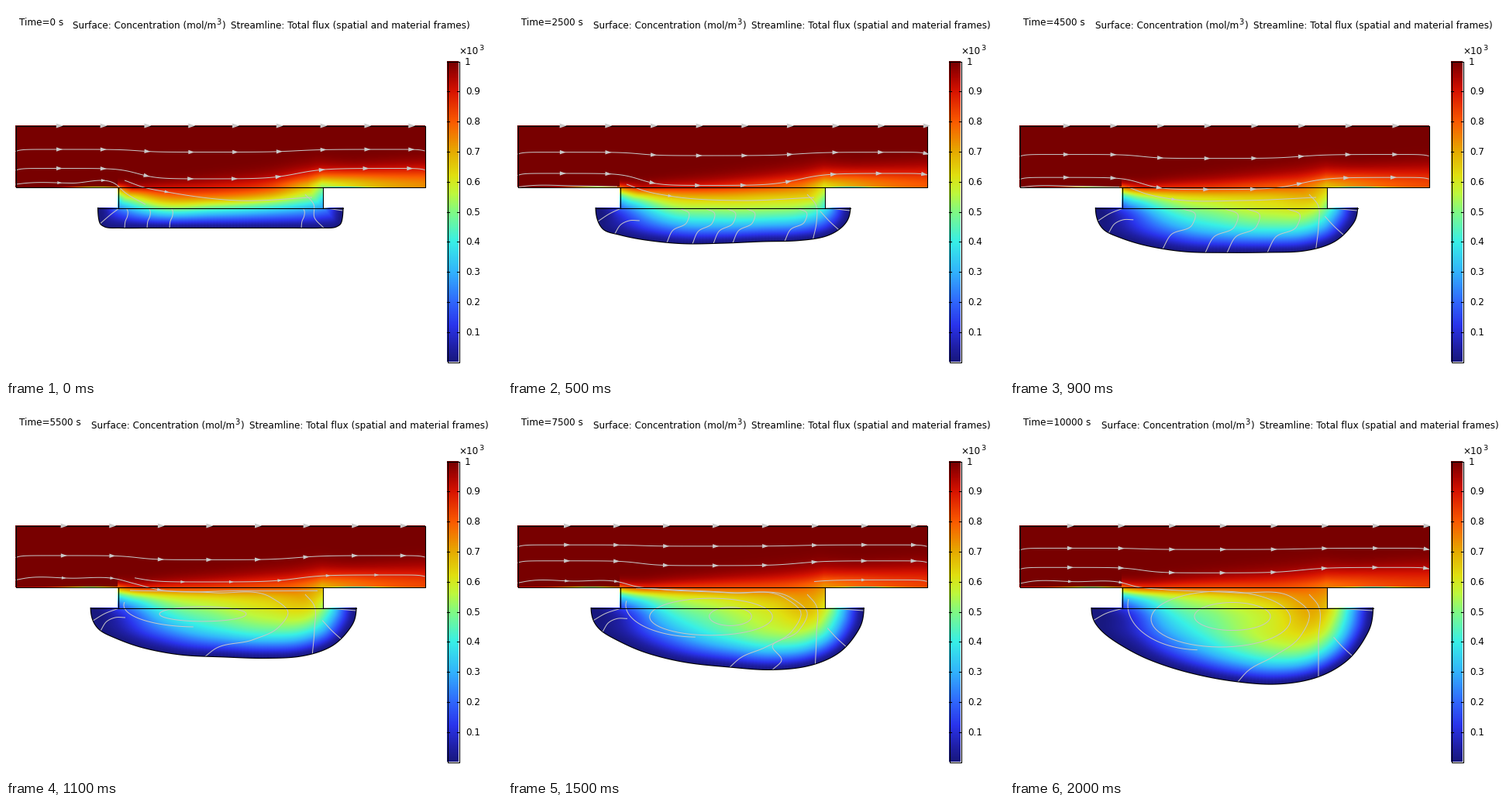
A matplotlib script that plays this animation: 640x480 px, repeating every 2100 ms.

```python
import numpy as np
import matplotlib.pyplot as plt
from matplotlib.animation import FuncAnimation
from matplotlib.collections import LineCollection, PolyCollection
from matplotlib.colors import LinearSegmentedColormap

PX = 0.72  # points per pixel at 100 dpi
plt.rcParams["font.family"] = "DejaVu Sans"
GREY = "#c8c8c8"
STEPS, DT = 21, 500
X0, X1, NL, NR = 12.5, 540.5, 144.5, 408.5
TOP, WALL, LID = 154.5, 233.5, 260.5

CMAP = LinearSegmentedColormap.from_list("rainbow_dark", [
    (0, "#18187f"), (.05, "#2020a8"), (.12, "#2a34ec"), (.2, "#3068fc"),
    (.3, "#32b4fc"), (.4, "#38f0e6"), (.5, "#82fa82"), (.56, "#bef83c"),
    (.62, "#e0e010"), (.7, "#e6aa00"), (.8, "#fa5a00"), (.9, "#d81400"),
    (.95, "#aa0400"), (1, "#780000")], N=512)


def spline(x, xk, yk):
    """Cubic Hermite interpolation along the first axis, clamped at the ends."""
    x, xk, yk = np.asarray(x, float), np.asarray(xk, float), np.asarray(yk, float)
    m = np.gradient(yk, xk, axis=0)
    i = np.clip(np.searchsorted(xk, x) - 1, 0, len(xk) - 2)
    tail = x.shape + (1,) * (yk.ndim - 1)
    h = (xk[i + 1] - xk[i]).reshape(tail)
    s = np.clip((x - xk[i]).reshape(tail) / h, 0, 1)
    return ((1 + 2 * s) * (1 - s) ** 2 * yk[i] + s * (1 - s) ** 2 * h * m[i]
            + s * s * (3 - 2 * s) * yk[i + 1] + s * s * (s - 1) * h * m[i + 1])


# Etched basin: left edge, right edge, then depths from left to right
TIMES = [0, 1500, 3500, 6500, 10000]
BASIN = np.array([
    [118.5, 435, 24, 26, 26, 26, 26, 26, 26, 26, 24],
    [114.7, 438.5, 26, 32, 37, 40, 39, 37, 35.5, 33, 23],
    [111.5, 445, 26, 38, 47, 52.5, 52.2, 50, 49, 40, 21],
    [108, 455.5, 25, 40, 55, 65, 69, 72.5, 69, 55, 29.5],
    [105, 468.5, 25, 46, 67, 83.5, 94.5, 98.5, 90.5, 69, 36]])
ANGLES = np.pi * np.r_[0, .05, np.arange(1, 10) / 10, .95, 1]


def basin(t):
    left, right, *d = [np.interp(t, TIMES, col) for col in BASIN.T]
    side = np.interp(t, TIMES[:2], [.75, .56])
    a = np.linspace(0, np.pi, 121)
    depth = spline(a, ANGLES, [0, side * d[0], *d, side * d[-1], 0])
    return left + (right - left) * (1 - np.cos(a)) / 2, LID + depth


# Concentration level away from the basin wall
COLS = [112, 150, 200, 270, 340, 400, 465]
ROWS = [233, 246, 260, 300]


def level(left, right, *rows):
    return np.array([[r[0] if k < 2 else left, *r, r[-1] if k < 2 else right]
                     for k, r in enumerate(rows)])


EARLY = level(.15, .2, [1.08, 1.05, 1.02, .95, .73], [.76, .97, .98, .87, .66],
              [.52, .92, .87, .74, .55], [.5, .92, .85, .72, .55])
MIDDLE = level(.1, .35, [1, .92, .88, .82, .78], [.58, .66, .69, .69, .73],
               [.29, .52, .62, .67, .65], [.28, .4, .6, .68, .6])
LATE = level(.1, .5, [.93, .87, .84, .83, .8], [.45, .56, .63, .7, .76],
             [.2, .44, .55, .63, .73], [.14, .33, .51, .63, .68])
xs, ys = np.arange(12, 541) + .5, np.arange(154, 362) + .5


def surface(t):
    bx, by = basin(t)
    w = np.interp(t, TIMES, [0, .6, 1, 1.65, 2])
    core = EARLY + (MIDDLE - EARLY) * min(w, 1) + (LATE - MIDDLE) * max(w - 1, 0)
    c = spline(xs, COLS, spline(ys, ROWS, core).T).T
    low = ys >= WALL
    d2 = ((xs - bx[:, None]) ** 2)[:, None, :] + ((ys[low] - by[:, None]) ** 2)[:, :, None]
    c[low] *= 1 - np.exp(-(np.sqrt(d2.min(axis=0)) / 31) ** 1.4)
    c = np.clip(c, 0, 1)

    # boundary layer carried along the channel floor
    floor = c[np.argmax(low)].copy()
    floor[xs < NL] = 1
    end = floor[np.searchsorted(xs, NR) - 1]
    out = np.interp(t, TIMES, [.77, .82, .85, .855, .86])
    past = xs >= NR
    floor[past] = end + (out - end) * (1 - np.exp(-(xs[past] - NR) / 70))
    thick = 4 + .052 * np.clip(xs - NL, 0, None) + t * 2e-4
    power = np.interp(xs, [144, 400, 450], [1.2, 1.5, 2])
    h = (WALL - ys[~low])[:, None]
    c[~low] = 1 - (1 - floor) * np.exp(-(h / thick) ** power)

    y = ys[:, None]
    neck = (xs > NL - 1) & (xs < NR + 1) & (y <= LID)
    pit = (y > LID - 1) & (np.interp(xs, bx, by, left=0, right=0) > y)
    rgba = CMAP(c)
    rgba[..., 3] = (y <= WALL) | neck | pit
    return rgba


def arclength(p):
    return np.r_[0, np.cumsum(np.hypot(*np.diff(p, axis=0).T))]


def curve(*pts):
    p = np.array(pts, float)
    d = arclength(p)
    return spline(np.linspace(0, d[-1], 90), d, p)


def arc(cx, cy, rx, ry, a0=0, a1=360):
    a = np.radians(np.linspace(a0, a1, 60))
    return np.column_stack([cx + rx * np.cos(a), cy + ry * np.sin(a)])


def lane(base, dip, start=X0):
    x = np.linspace(start, X1, 160)
    bump = (np.tanh((x - 170) / 25) - np.tanh((x - 375) / 35)) / 2
    y = base + dip * bump + 2.5 * np.exp((X0 - x) / 6) + 2 * np.exp((x - X1) / 6)
    return np.column_stack([x, y])


def heads(p, gap, count, size):
    s = arclength(p)
    tris = []
    for pos in gap * np.arange(1, count + 1):
        if pos > s[-1] + .5:
            break
        at, back = (np.array([np.interp(q, s, p[:, k]) for k in (0, 1)])
                    for q in (pos, pos - 3))
        u = (at - back) / np.hypot(*(at - back))
        n = np.array([-u[1], u[0]])
        tris.append([at + 4.5 * size * u, at - size * (4.5 * u - 3 * n),
                     at - size * (4.5 * u + 3 * n)])
    return tris


def channel_lanes(t):
    lanes = [lane(193 + (t - 5500) * (.0034 if t > 5500 else .00145), 3.5 + t * 3.5e-4)]
    if t <= 4500:
        lanes.append(lane(209.5 + t * .0026, min(13.5 + t * .0013, 15.5)))
    if t > 6000:
        lanes.append(lane(177.5 + (t - 6500) * .0017, 1.7))
    return lanes


def basin_lines(t):
    """Thin streamlines in and next to the basin, each with its arrow count."""
    bx, by = basin(t)
    left, right = bx[0], bx[-1]
    d = by.max() - LID

    def wall(x, up=0):
        return x, np.interp(x, bx, by) - up

    def rise(x, lean):
        dx = np.interp(x, bx, by) - LID
        return curve(wall(x), (x + .25 * lean, LID + .66 * dx), (x + .9 * lean, LID + .42 * dx),
                     (x + lean, LID + .15 * dx), (x + .6 * lean, LID + .02 * dx))

    def hook(x_turn, x_end, *lead):
        return curve(*lead, (x_turn - 95, 241), (x_turn - 22, 247), (x_turn, 267),
                     (x_turn - 12, LID + .38 * d), (x_turn - 45, LID + .63 * d),
                     wall(x_end + 12, .15 * d), wall(x_end))

    xr = np.interp(t, [0, 1500, 10000], [410, 393, 398])
    riser = wall(xr)
    lines = [
        (curve((right - .5, 264), (410, LID)), 0),
        (curve(wall(left + 3), (left + 18, 268), (146, 261)), 0),
        (curve(riser, (398, .45 * riser[1] + 144), (397, 256), (386, 243)), 0)]
    if t >= 1000:
        x, y = wall(right - 11 - t * .0016)
        lines.append((curve((x, y), (x - 12, y - 11), (x - 24, y - 24)), 0))
        if t < 9500:
            x, y = wall(np.interp(t, [1500, 5500], [143, 122]))
            lines.append((curve((x, y), (x + 8, y - 12), (x + 19, y - 17), (x + 32, y - 17)), 0))

    if t <= 4500:
        y = np.interp(t, TIMES[:3], [228.5, 231.5, 232.5])
        dive = [(X0, y + 1.5), (26, y), (85, y), (141, y + 1), (154, 241)]
        lines.append((curve(*dive, (180, 256)), 2) if t < 1000 else (curve(*dive[:4]), 0))
        y = 225 + t * .002
        lines.append((curve((153, y), (178, y + 9), (208, y + 15), (300, 251), (395, 247)), 1))
        seeds = ([153, 182, 211, 381] if t < 1000 else
                 [205, 238, 265, 290, 357] if t < 3000 else [197, 252, 280, 332])
        lean = np.interp(t, TIMES[:3], [4, 15, 42])
        return lines + [(rise(x, lean), 0) for x in seeds]

    grow = [5500, 6500, 10000]
    y = np.interp(t, grow, [222, 225.5, 226.5])
    dive = [(X0, y + 2.5), (26, y), (85, y + .2), (142, y + 1), (165, y + 7), (195, 236.5)]
    turn = np.interp(t, grow, [364, 375, 386])
    end = np.interp(t, grow, [257, 283, 294])
    if t <= 6000:
        lines += [(curve(*dive, (300, 238.5), (402, 238.5)), 3),
                  (hook(turn, end, (160, 238)), 0)]
    else:
        lines.append((hook(turn, end, *dive), 2))
        if t < 9500:
            lines.append((hook(turn + 8, end + 55, (165, 235)), 0))
    if t < 9500:
        start = 166 if t < 7500 else 395
        lines.append((lane(218 + (t - 5500) * .0032, 9, start), 5 if t < 7500 else 1))

    ry = np.interp(t, grow, [9.5, 19, 36])
    lines.append((arc(254 + (t - 5500) * .004, 266 + ry / 4, np.interp(t, grow, [56, 75, 90]), ry), 0))
    if t >= 7500:
        lines.append((arc(287, 271.5, 36 + (t - 8500) * .0087, ry / 2), 0))
    lines.append((arc(245, 257, 93, 28 + (t - 5500) * .0066, 92, 188), 0))
    return lines


def streams(t):
    gap = np.interp(t, [0, 1500, 3500, 5500, 10000], [56.8, 58.55, 58.75, 62.6, 65.7])
    lines = channel_lanes(t)
    tris = heads(np.array([[X0, TOP], [X1, TOP]]), gap, 9, 1)
    for p in lines:
        tris += heads(p, gap, 9, .9)
    for p, count in basin_lines(t):
        lines.append(p)
        tris += heads(p, gap, count, .65)
    return lines, tris


fig = plt.figure(figsize=(6.4, 4.8), dpi=100, facecolor="white")
ax = fig.add_axes([0, 0, 1, 1])
ax.axis("off")


def label(x, y, s, size=12):
    return ax.text(x, y, s, fontsize=size * PX, ha="left", va="baseline", color="black")


def stroke(x, y):
    return ax.plot(x, y, color="black", lw=PX * 1.1, zorder=4)[0]


def box(x0, y0, x1, y1):
    stroke([x0, x1, x1, x0, x0], [y0, y0, y1, y1, y0])


# colour bar
ax.imshow(np.linspace(1, 0, 388)[:, None], cmap=CMAP, extent=(569, 584, 459, 71),
          aspect="auto", interpolation="nearest")
box(569.5, 71.5, 584.5, 459.5)
for n in range(1, 11):
    y = 459 - 38.8 * n
    label(593 if n < 10 else 592, y + 4.5, f"{n / 10:g}")
    for x in (569, 582):
        stroke([x, x + 3], [y + .5, y + .5])
label(584, 62, "×10")
label(610, 57, "3", 9.5)

# fixed walls
box(X0, TOP, X1, WALL)
for x in (NL, NR):
    stroke([x, x], [WALL, LID])
lid, floor_line = stroke([], []), stroke([], [])

clock = label(17, 25, "")
caption = [(0, label(0, 29, "Surface: Concentration (mol/m")),
           (185.5, label(0, 23.5, "3", 10)),
           (192.5, label(0, 29, ")")),
           (204.5, label(0, 29, "Streamline: Total flux (spatial and material frames)"))]

maps = [surface(DT * k) for k in range(STEPS)]
field = ax.imshow(maps[0], extent=(12, 541, 362, 154), aspect="auto",
                  interpolation="nearest", zorder=2)
flow = ax.add_collection(LineCollection([], colors=GREY, linewidths=PX, zorder=3))
tips = ax.add_collection(PolyCollection([], facecolors=GREY, edgecolors="none", zorder=5))
ax.set_xlim(0, 640)
ax.set_ylim(480, 0)


def draw(k):
    t = DT * k
    bx, by = basin(t)
    field.set_data(maps[k])
    floor_line.set_data(bx, by)
    lid.set_data([bx[0], bx[-1]], [LID, LID])
    lines, tris = streams(t)
    flow.set_segments(lines)
    tips.set_verts(tris)
    clock.set_text(f"Time={t} s")
    x = 85.5 + 8 * (len(str(t)) - 1)
    for dx, part in caption:
        part.set_x(x + dx)
    return field, floor_line, lid, flow, tips, clock


anim = FuncAnimation(fig, draw, frames=STEPS, interval=100, repeat=True, blit=False)
plt.show()
```
